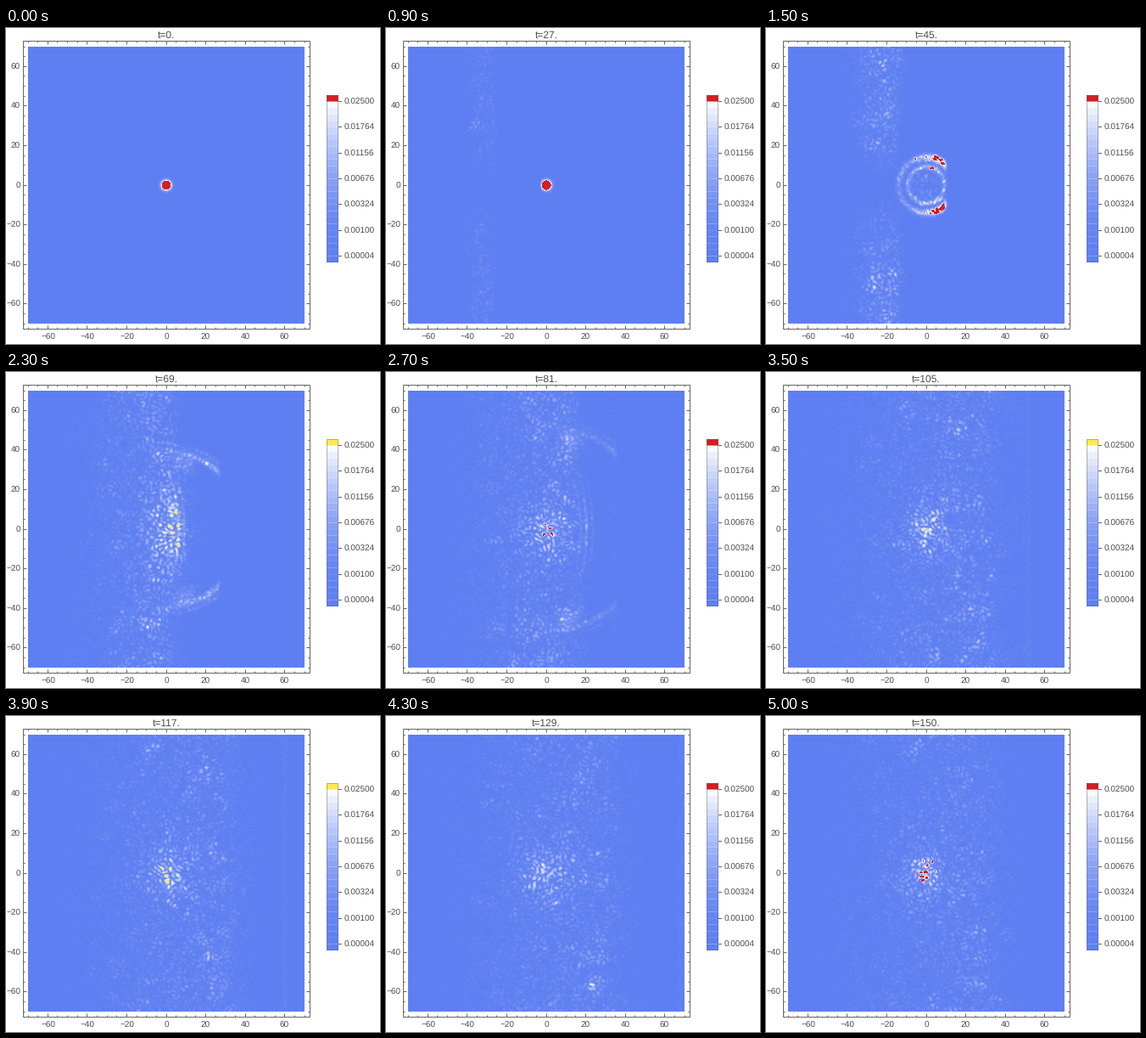
A matplotlib script for the animation above (5.1 s loop, 441 by 372 pixels).

```python
import numpy as np
import matplotlib.pyplot as plt
from matplotlib.animation import FuncAnimation
from matplotlib.patches import Rectangle

W, H, DPI = 441, 372, 100
FRAMES, INTERVAL, DT = 51, 100, 3
LEFT, TOP, SIDE = 26, 22, 326
CX, CY, UNIT = 189, 185, SIDE / 140
LEVELS, LIMIT = 25, 0.025
BLUE = np.array([94, 127, 241]) / 255
RED = np.array([211, 31, 38]) / 255
YELLOW = np.array([251, 233, 82]) / 255
GREY, INK = "#666666", "#4c4c4c"

plt.rcParams["font.family"] = "Liberation Sans"
plt.rcParams["text.hinting"] = "none"

# Colour bands are evenly spaced in the square root of the value
mix = (((np.arange(LEVELS) + 0.5) / LEVELS) ** 2)[:, None]
BANDS = BLUE * (1 - mix) + mix

axis = (np.arange(SIDE) + 0.5) / UNIT - 70
X, Y = np.meshgrid(axis, -axis)
RADIUS = np.hypot(X, Y)
freq = 2 * np.pi * np.fft.fftfreq(SIDE, 1 / UNIT)
K = np.hypot(*np.meshgrid(freq, freq))


def step(x, a, b):
    s = np.clip((x - a) / (b - a), 0, 1)
    return s * s * (3 - 2 * s)


def bell(x, width):
    return np.exp(-(x / width) ** 2)


def wave_spectrum(seed, k0, spread):
    rng = np.random.default_rng(seed)
    noise = rng.normal(size=(2, SIDE, SIDE))
    spec = (noise[0] + 1j * noise[1]) * bell(K - k0, spread)
    return spec / np.sqrt(np.mean(np.abs(np.fft.ifft2(spec)) ** 2))


FINE = wave_spectrum(4, 1.4, 0.9)
COARSE = wave_spectrum(9, 0.25, 0.2)


def speckle(spec, speed, t):
    return np.abs(np.fft.ifft2(spec * np.exp(-1j * speed * K * t))) ** 2


def haze(t):
    peak = min(-18 + 0.65 * (t - 45), 20)
    left = np.interp(t, [18, 45, 69, 105], [6, 13, 26, 42])
    right = np.interp(t, [18, 45, 69, 105], [3, 4, 7, 16])
    level = np.interp(t, [18, 45, 69, 105, 150], [0, 0.0024, 0.0015, 0.0013, 0.0011])
    gap = 1 - bell(Y, 24) * (1 - step(t, 48, 66))
    return level * gap * bell(X - peak, np.where(X < peak, left, right))


def core(t):
    early = 0.0016 * step(t, 36, 45) * bell(RADIUS, 8)
    strip = 0.0042 * step(t, 51, 67) * (1 - step(t, 69, 81))
    strip = strip * bell(X + 1, 8) * bell(Y, 25)
    cluster = 0.0065 * bell(RADIUS, 5) + 0.0026 * bell(RADIUS, 13)
    return early + strip + step(t, 63, 78) * cluster


def shells(t, front):
    """Circular shells spreading from the centre, cut off at the moving front."""
    r = 1.05 * (t - 31.6)
    if r <= 0:
        return 0
    lag = np.maximum(front - X, 0)
    outer = bell(RADIUS - r, 1.4) + 0.3 * step(t, 54, 66) * bell(RADIUS - r - 3.5, 1)
    inner = bell(RADIUS - 0.66 * r, 1.1)
    bright = 0.045 * np.exp(-(t - 45) / 14) * bell(lag, 0.5 * r + 4)
    bright = bright * step(np.abs(Y), 0.3 * r, 0.65 * r)
    faint = 0.016 * np.exp(-(t - 45) / 5)
    wake = 0.005 * step(t, 54, 66) * np.exp(-max(t - 81, 0) / 8)
    wake = wake * bell(RADIUS - 0.9 * r, 4) * bell(X - 0.22 * r, 5)
    fade = 0.3 * (1 - step(t, 48, 60))
    total = outer * (bright + 0.3 * faint) + inner * (fade * bright + 0.5 * faint)
    return np.minimum(total + wake, 0.06) * (1 - step(X, front - 1, front + 1))


def sheets(t, front):
    """Nearly flat wavefronts that run to the right."""
    place = X + Y ** 2 / 200 - 6 - 1.2 * (t - 69)
    lines = bell(place, 0.8) + 0.6 * bell(place + 3, 0.7) + 0.4 * bell(place - 3, 0.7)
    level = 0.012 * step(t, 58, 68) * np.exp(-max(t - 69, 0) / 12)
    edge = 0.0005 * step(t, 75, 90) * bell(X - front + 1, 1.5)
    return level * lines * bell(Y, 19) + edge


def density(t):
    front = 0.71 * (t - 31)
    fine = speckle(FINE, 0.7, t)
    patch = 0.6 + 0.4 * speckle(COARSE, 0.25, t)
    width = 3.3 * (1 + 0.001 * t)
    dot = 0.133 * np.exp(-RADIUS ** 2 / width) * step(X, front - 1, front + 1)
    fronts = shells(t, front) + sheets(t, front)
    return dot + haze(t) * fine * patch + core(t) * fine + fronts * (0.5 + 0.5 * fine)


def cap_colour(i):
    yellow = 17 <= i <= 18 or 23 <= i <= 25 or 34 <= i <= 42
    return YELLOW if yellow else RED


def picture(i):
    v = density(i * DT)
    cap = cap_colour(i)
    band = np.sqrt(v / LIMIT) * LEVELS
    rgb = BANDS[np.minimum(band.astype(int), LEVELS - 1)]
    rgb[v >= LIMIT] = cap
    if i > 24 and cap is RED:
        # dark flecks beside the clipped peaks
        cells = np.random.default_rng(i).random((SIDE // 2, SIDE // 2)) < 0.12
        flecks = cells.repeat(2, 0).repeat(2, 1)
        rgb[flecks & (v > 0.019) & (v < LIMIT)] = 0.12
    return rgb


fig = plt.figure(figsize=(W / DPI, H / DPI), dpi=DPI, facecolor="white")
ax = fig.add_axes([0, 0, 1, 1])
ax.axis("off")


def px(n):
    return n * 72 / DPI


def line(x0, y0, x1, y1):
    ax.plot([x0, x1], [y0, y1], color=GREY, lw=px(1),
            solid_capstyle="butt", snap=False)


def box(x0, y0, x1, y1, **style):
    return ax.add_patch(Rectangle((x0, y0), x1 - x0, y1 - y0, snap=False, **style))


def label(x, y, text, size=10, ha="center"):
    return ax.text(x, y, text, fontsize=px(size), color=INK, ha=ha, va="baseline")


def draw_frame(x0=20.5, y0=15.5, x1=358.5, y1=354.5):
    box(x0, y0, x1, y1, fill=False, ec=GREY, lw=px(1))
    for n in range(-70, 71, 5):
        major = n % 20 == 0
        size = 4 if major else 2
        x, y = np.floor([CX + n * UNIT, CY - n * UNIT]) + 0.5
        line(x, y0, x, y0 + size)
        line(x, y1, x, y1 - size)
        line(x0, y, x0 + size, y)
        line(x1, y, x1 - size, y)
        if major:
            text = str(n).replace("-", "\u2212")
            label(x, 366.5, text)
            label(17, y + 3.5, text, ha="right")


def draw_legend(x0=378, x1=392, y0=79, y1=276):
    h = (y1 - y0) / (LEVELS + 1)
    for n, colour in enumerate(BANDS):
        box(x0, y1 - (n + 1) * h, x1, y1 - n * h, fc=colour, lw=0)
    top = box(x0, y0, x1, y0 + h, fc=RED, lw=0)
    box(x0 + 0.5, y0 + 0.5, x1 - 0.5, y1 - 0.5, fill=False, ec=GREY,
        lw=px(1), alpha=0.45)
    for n in range(1, LEVELS + 1, 4):
        y = np.floor(y1 - n * h) + 0.5
        line(x1, y, x1 + 4, y)
        label(399, y + 3.5, f"{LIMIT * (n / LEVELS) ** 2:.5f}", ha="left")
    return top


image = ax.imshow(picture(0), extent=(LEFT, LEFT + SIDE, TOP + SIDE, TOP),
                  interpolation="nearest", aspect="auto")
draw_frame()
cap_patch = draw_legend()
title = label(CX, 12, "t=0.", size=12)
ax.set_xlim(0, W)
ax.set_ylim(H, 0)


def update(i):
    image.set_data(picture(i))
    cap_patch.set_facecolor(cap_colour(i))
    title.set_text(f"t={i * DT}.")
    return image, cap_patch, title


anim = FuncAnimation(fig, update, frames=FRAMES, interval=INTERVAL,
                     repeat=True, repeat_delay=0, blit=False)
plt.show()
```
